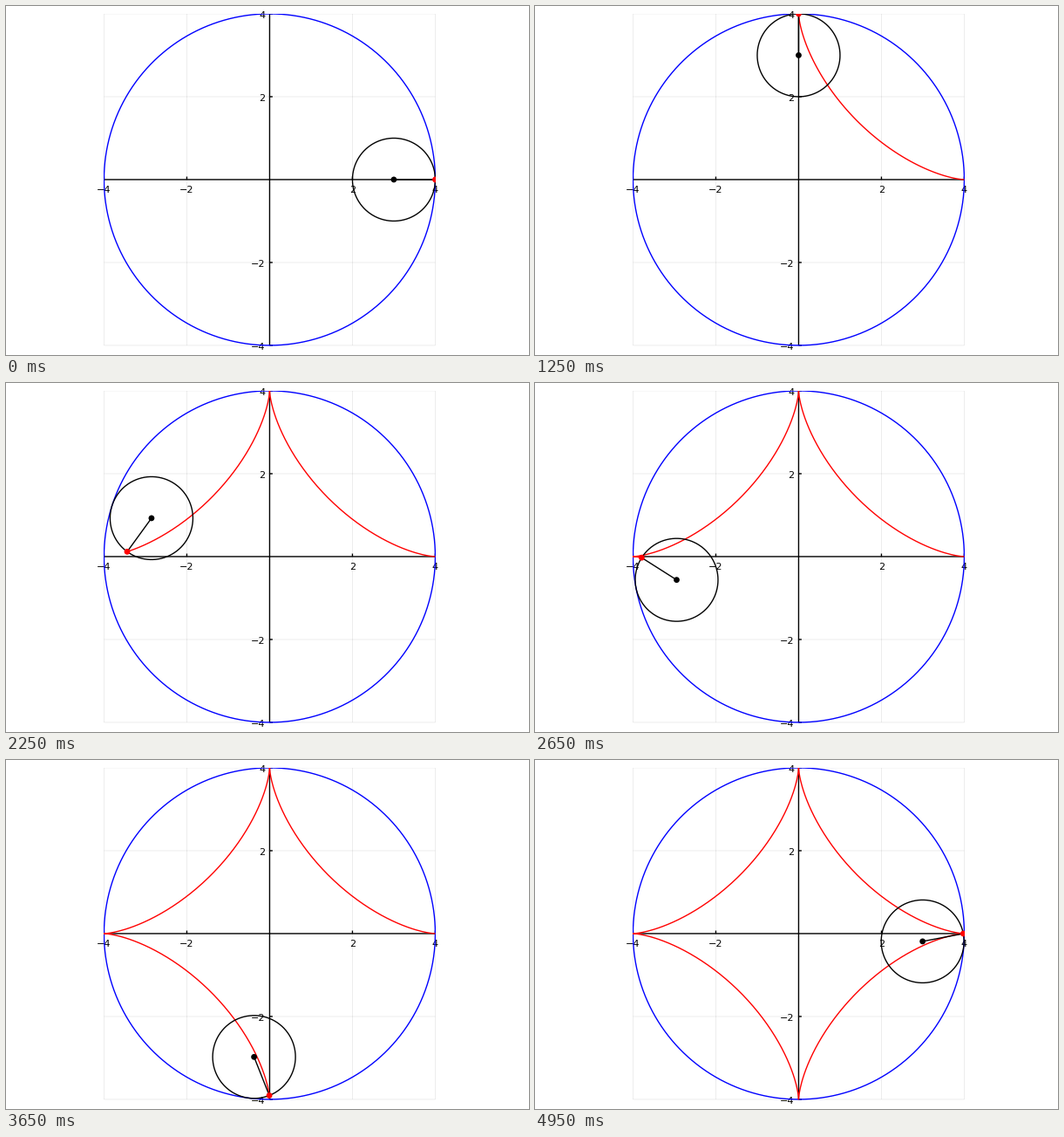
Animation, 600 px wide and 400 px high, one loop 5 s. Source, as a matplotlib script:

```python
import numpy as np
import matplotlib.pyplot as plt
from matplotlib.animation import FuncAnimation
from matplotlib.patches import Circle
from matplotlib.transforms import Bbox

W, H, DPI = 600, 400, 100
FRAMES, INTERVAL = 100, 50
UNIT = 47.5                # pixels per unit
X0, Y0 = 302.45, 198.95    # origin, in pixels from the top left
BIG, SMALL = 4, 1
DOT = 3.4 / UNIT
TICK = 3.4 / UNIT
LABEL_DROP = 15 / UNIT
LABEL_GAP = 5.2 / UNIT
LABEL_SHIFT = 5 / UNIT

plt.rcParams["font.family"] = "DejaVu Sans"
fig = plt.figure(figsize=(W / DPI, H / DPI), dpi=DPI, facecolor="white")
side = 2 * BIG * UNIT
ax = fig.add_axes([(X0 - side / 2) / W, 1 - (Y0 + side / 2) / H, side / W, side / H])
ax.set(xlim=(-BIG, BIG), ylim=(-BIG, BIG))
ax.axis("off")
clip = Bbox([[112, 10], [493, 391]])


def line(xs, ys, color="black", width=1, alpha=1, z=2):
    item, = ax.plot(xs, ys, color=color, lw=width, alpha=alpha, zorder=z,
                    solid_capstyle="butt", snap=False)
    item.set_clip_box(clip)
    return item


def dot(color, z):
    item = ax.add_patch(Circle((0, 0), DOT, fc=color, ec="none", zorder=z))
    item.set_clip_box(clip)
    return item


def draw_axes():
    for v in (-4, -2, 2, 4):
        line([v, v], [-BIG, BIG], width=0.5, alpha=0.1, z=0)
        line([-BIG, BIG], [v, v], width=0.5, alpha=0.1, z=0)
        line([v, v], [0, TICK], z=1)
        line([0, TICK], [v, v], z=1)
        label = str(v).replace("-", "\u2212")
        ax.text(v, -LABEL_DROP, label, size=8, ha="center", va="baseline", zorder=1)
        ax.text(-LABEL_GAP, v - LABEL_SHIFT, label, size=8, ha="right",
                va="baseline", zorder=1)
    line([-BIG, BIG], [0, 0], z=1)
    line([0, 0], [-BIG, BIG], z=1)


draw_axes()
turn = np.linspace(0, 2 * np.pi, 361)
ring_x, ring_y = np.cos(turn), np.sin(turn)
line(BIG * ring_x, BIG * ring_y, "blue", z=2)
trace = line([], [], "red", z=3)
wheel = line([], [], z=4)
spoke = line([], [], z=5)
hub = dot("black", 6)
pen = dot("red", 7)


def astroid(t):
    return BIG * np.cos(t) ** 3, BIG * np.sin(t) ** 3


def update(k):
    t = 2 * np.pi * k / FRAMES
    cx, cy = (BIG - SMALL) * np.cos(t), (BIG - SMALL) * np.sin(t)
    px, py = astroid(t)
    trace.set_data(*astroid(np.linspace(0, t, 4 * k + 1)))
    wheel.set_data(cx + SMALL * ring_x, cy + SMALL * ring_y)
    spoke.set_data([cx, px], [cy, py])
    hub.center = cx, cy
    pen.center = px, py
    return trace, wheel, spoke, hub, pen


anim = FuncAnimation(fig, update, frames=FRAMES, interval=INTERVAL,
                     repeat=True, repeat_delay=0)
plt.show()
```
